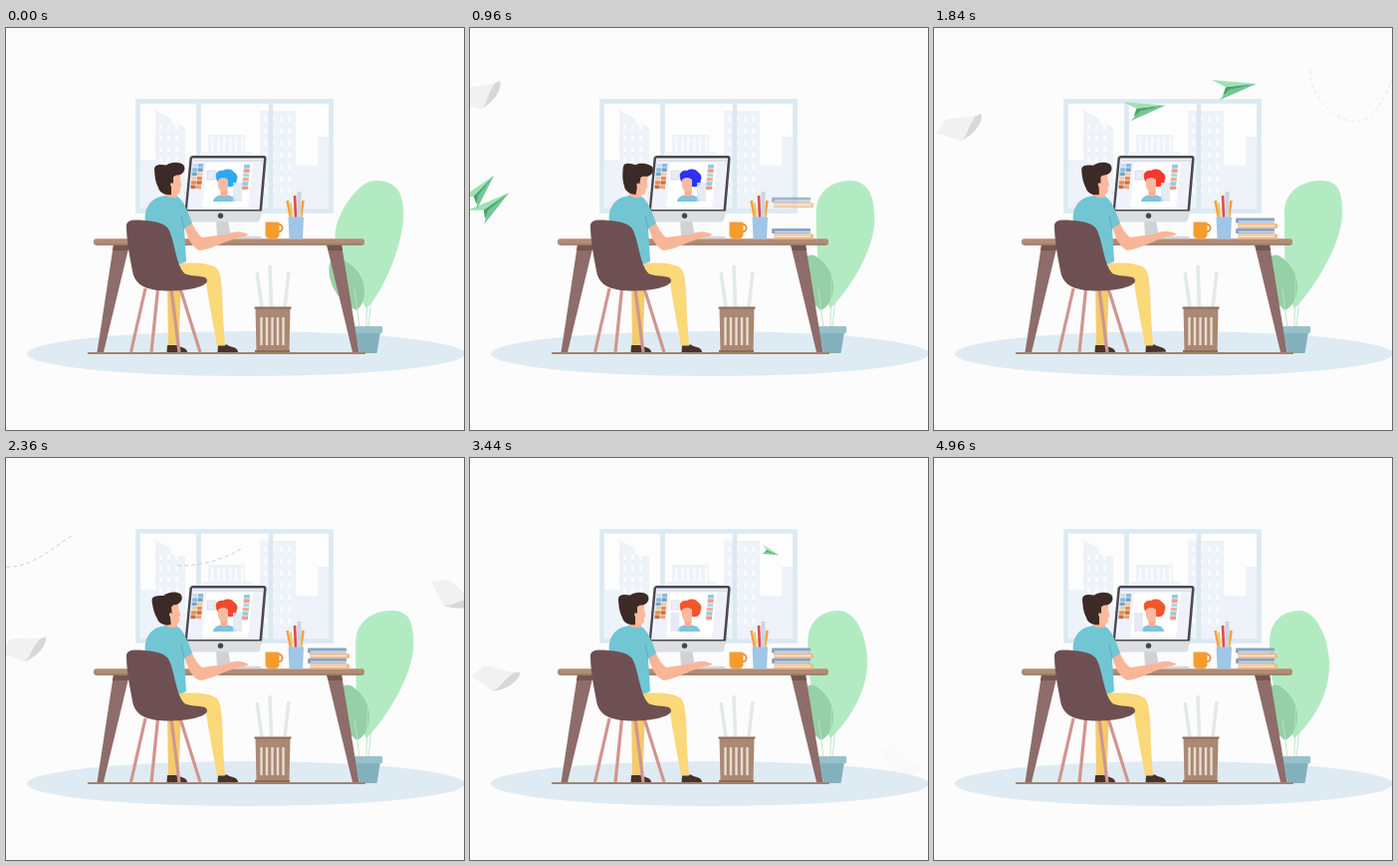
These frames come from a looping animation (460 by 403 pixels, 5 s). An HTML page:

```html
<!DOCTYPE html>
<html lang="en">
<head>
<meta charset="utf-8">
<title>Designer at a desk</title>
<style>
html, body { margin: 0; width: 100%; height: 100%; overflow: hidden; background: #fcfcfc; }
svg { display: block; width: 100vw; height: 100vh; }
.trail { fill: none; stroke: #c3d6d5; stroke-dasharray: 4 3; }
</style>
</head>
<body>
<svg viewBox="0 0 460 403">
  <defs>
    <g id="plane">
      <path fill="#9ce2b4" d="M0 0L-44-10L-31-1Z"/>
      <path fill="#4f9f72" d="M0 0L-31-1L-35 7L-27 3Z"/>
      <path fill="#72c993" d="M0 0L-28 2L-39 11Z"/>
    </g>
    <g id="sheet">
      <path fill="#f1f1f1" d="M-22 8L-14-6C-4-10 6-8 16-12L11 8L3 14Z"/>
      <path fill="#d8d8d8" d="M22-14C24-6 16 8 3 14C10 8 8 2 15-9C17-13 20-13 22-14Z"/>
    </g>
    <g id="pair">
      <rect x="303" width="39" height="5" rx="1" fill="#86a3c8"/>
      <rect x="306" y="2.8" width="36" height="1.4" fill="#d3dfec"/>
      <rect x="305" y="5.5" width="40" height="5" rx="1" fill="#f0bb8a"/>
      <rect x="305" y="7" width="37" height="1.600" fill="#f8e3cf"/>
    </g>
  </defs>
  <rect width="460" height="403" fill="#fcfcfc"/>
  <ellipse cx="241" cy="326.5" rx="220" ry="22.5" fill="#dfebf3"/>

  <!-- window -->
  <rect x="132.5" y="73.5" width="194" height="110" fill="#fdfdfe"/>
  <g fill="#eef2f9">
    <path d="M135 132H150V82L166 91V96L180 99V183H135Z"/>
    <path d="M197 124H203V107H240V124H247V183H197Z"/>
    <path d="M255 83H291V138H313V109H325V183H255Z"/>
  </g>
  <g id="lights" fill="#fafbfd"></g>
  <path d="M132.5 73.5H326.5V183.5H132.5ZM193.5 73V184M266 73V184" fill="none" stroke="#dae9f2" stroke-width="4.6"/>

  <!-- plant -->
  <path id="leaf" fill="#b2ebc2"/>
  <path id="small" fill="#96d0a6" d="M352 283C338 276 325 262 324.500 243C324 232 330 229 337 232C352 238 361 252 360 266C359 276 356 280 352 283Z"/>
  <path d="M364 220L362 300M350 262L355 300M367 270L364 300" fill="none" stroke="#bfdfca" stroke-width=".9"/>
  <path fill="#82b1bd" d="M351 305H376L372.500 326H355Z"/>
  <rect x="348" y="299" width="30" height="7" rx="1" fill="#96c1cb"/>

  <!-- bin -->
  <path d="M252 245L257 280M265 238L266.500 280M284 244L280 280" stroke="#e2e9eb" stroke-width="3.500"/>
  <path fill="#a98974" d="M250.500 280H285.500L284.500 325H251.500Z"/>
  <path d="M249.500 280.500H286.500M250 324H285" stroke="#8c6c5c" stroke-width="2"/>
  <path d="M256.500 290V318M262 290V318M267.500 290V318M273 290V318M278.500 290V318" stroke="#e8dcd4" stroke-width="2.400"/>

  <!-- desk -->
  <path d="M82 326H361" stroke="#a5816e" stroke-width="2"/>
  <path fill="#8e6c69" d="M108 217H124L98 325H91.500ZM322 217H337L354.500 325H348Z"/>
  <path fill="#77564f" d="M108 217H124L122.500 223H107ZM322 217H337L338 223H323.500Z"/>
  <rect x="88" y="211.200" width="272" height="6.500" rx="2.500" fill="#b18c75"/>
  <path d="M90 217H358" stroke="#93705f" stroke-width="1.200"/>

  <!-- monitor -->
  <path fill="#cfd1d4" d="M211 193H223L226 209H212Z"/>
  <path d="M205 210H255" stroke="#d5d7da" stroke-width="2.500" stroke-linecap="round"/>
  <path fill="#dcdee1" d="M180 182H257.500L255.500 191Q255 194.500 251.500 194.500H179Z"/>
  <path fill="#484a50" d="M187.500 128H259.500Q262 128.500 261.500 131.500L257 183.500H179.500L184.500 130.500Q185 128 187.500 128Z"/>
  <path fill="#eff2fa" d="M187 130.500H259L254.500 182H182Z"/>
  <path fill="#fff" d="M201 135H248L243 180H197Z"/>
  <path d="M188 133H258" stroke="#d8dde8" stroke-width="1.500"/>
  <circle cx="215.500" cy="188.300" r="2.700" fill="#45474c"/>
  <g id="swatches"></g>
  <rect id="tile" x="202" y="143" width="8" height="9" fill="#e9edf5" stroke="#cdd5e2" stroke-width=".7"/>
  <path fill="#7fc3e2" d="M208 174C208.500 169 213 167.500 219 167.500C226 167.500 230.500 169 231 174Z"/>
  <path fill="#f6b092" d="M215.500 158H222.500V167.500Q219 171 215.500 167.500Z"/>
  <path id="hair" d="M211 150C209.500 145 214 142 218 143C222 140.500 227 141.500 229 144.500C233 147 233 151 231.500 153C232 157 228 160 224 159C219 160 211 155 211 150Z"/>
  <path fill="#f9bb9e" d="M213 152Q218 148 223 152V159Q222 164.500 217.500 164Q213.500 163 213 158Z"/>
  <rect id="panel" y="155" width="9" height="19" fill="#dfe6f3" opacity=".8"/>

  <!-- desk items -->
  <circle cx="274" cy="200.500" r="3.600" fill="none" stroke="#e98c1f" stroke-width="1.800"/>
  <path fill="#f59c2b" d="M260.500 194.500H274.500V207Q274 211 270.500 211H264.500Q261 211 260.500 207Z"/>
  <path d="M282.500 173L286 190M298.500 173L296 190" stroke="#f4a13f" stroke-width="2.600"/>
  <path d="M294.500 164V190" stroke="#cfd4da" stroke-width="4"/>
  <path d="M290 168L291 190" stroke="#dd4950" stroke-width="2.600"/>
  <path d="M286 175L287.500 190" stroke="#f6c667" stroke-width="2"/>
  <path fill="#9fc6e9" d="M283.500 189.500H299L298 211.500H284.500Z"/>
  <use id="low" href="#pair"/>
  <use id="high" href="#pair"/>

  <!-- man -->
  <path fill="#f3cb69" d="M162 250H176L173.500 319H163Z"/>
  <path fill="#47322d" d="M162 318H173C176 321 182 320 182 325H161.500Z"/>
  <path id="foot" fill="#47322d" d="M213 317.500H222C226 320.500 233 319.500 233 325H212.500Z"/>
  <path fill="#fbd878" d="M170 237C186 234 206 236 212 241C217.500 248 217 264 218 290L220 318.500H212C208 296 204 276 201 256L172 250Z"/>
  <path fill="#f9b597" d="M160 156H172V169Q166 174 160 169Z"/>
  <path id="arm" fill="#f9b597" d="M179 199L187 196C190 203 194 208 197 210L222 207C228 204 235 202.500 243 207C243 209 238 209 233 210L222 214C210 219 200 223 194 223C186 219 182 210 179 199Z"/>
  <path fill="#72c5d2" d="M140 196C138 181 145 171 156 169L160 168Q167 172 172 169C178 172 183 184 187 196L179 201L181 234C174 238 165 237 157 236L141 205Z"/>
  <path d="M179 201L176 188" stroke="#58aebd" fill="none"/>
  <g id="head">
    <path fill="#fbb99c" d="M165 146H175V152L176.500 158L175 160V164Q174 167 170 167H163Z"/>
    <path fill="#3c2a26" d="M149 142C149 136 156 137 161 137.500C166 134 174 134 178 137C181 141 179 145 175 147C172 148 169 147 168 150V156C166 154 164 157 166 159V167C160 168 154 165 153 160C150 154 149.500 149 149 142Z"/>
  </g>

  <!-- chair -->
  <path d="M140 261L125.500 325M152.500 262L146 325M166 262L174 325M175 261L195 325" stroke="#d1958f" stroke-width="3.200"/>
  <path fill="#6e5053" d="M121 199C120.500 193 126 192 134 192.500C150 193.500 160 195 164 203C170 217 171 239 180 246.500C189 250 203 247 202 254C200 260 180 264 160 263.500C142 262.500 131 259 127.500 246C124 228 121 212 121 199Z"/>

  <g id="trails"></g>
  <g id="air"></g>
  <use id="sheetA" href="#sheet"/>
  <use id="sheetB" href="#sheet"/>
</svg>
<script>
const LOOP = 5000;
const $ = id => document.getElementById(id);
const set = (id, name, value) => $(id).setAttribute(name, value);
const clamp = v => Math.max(0, Math.min(1, v));
const span = (t, a, b) => clamp((t - a) / (b - a));
const ease = (t, a, b) => .5 - .5 * Math.cos(Math.PI * span(t, a, b));
const bump = (t, mid, width) => Math.exp(-(((t - mid) / width) ** 2));

// Each plane follows one Bezier curve and points along it
const flights = [
  { from: 600, to: 2240, size: () => 1, x: [-30, 58, 218, 520], y: [225, 135, 31, 50] },
  { from: 500, to: 2260, size: () => .95, x: [-30, 64, -2, 510], y: [215, 106, 99, 45] },
  { from: 2900, to: 3367, size: () => 1.1, x: [-40, 56, 51, -60], y: [40, 125, 120, 130] },
  { from: 2700, to: 4300, size: u => .3 + .6 * Math.abs(u - .25), x: [500, 147, 354, 520], y: [226, -17, 160, 140] }
];
const trails = [
  { d: "M8 160Q13 146 22 132", from: 1200, to: 1700 },
  { d: "M378 42C376 66 400 92 422 94C442 94 452 72 460 52", from: 1240, to: 1900 },
  { d: "M0 109C26 110 44 92 66 78", from: 2040, to: 2640 },
  { d: "M172 108C198 108 218 102 238 90", from: 1960, to: 2560 },
  { d: "M382 144L440 185", from: 2900, to: 3300 }
];
$("trails").innerHTML = trails.map((p, i) => `<path class="trail" id="trail${i}" d="${p.d}"/>`).join("");
$("air").innerHTML = flights.map((f, i) => `<use id="plane${i}" href="#plane"/>`).join("");

function grid(id, x, y, cols, rows, dx, dy, w, h, colors) {
  for (let r = 0; r < rows; r++) for (let c = 0; c < cols; c++) {
    const fill = colors ? ` fill="${colors[(r + c) % colors.length]}"` : "";
    const lean = colors ? r * .4 : 0;
    $(id).innerHTML += `<rect x="${x + c * dx - lean}" y="${y + r * dy}" width="${w}" height="${h}"${fill}/>`;
  }
}
grid("lights", 154, 97, 3, 7, 8, 11, 3, 5);
grid("lights", 206, 110, 6, 1, 6, 9, 2.5, 14);
grid("lights", 259, 89, 4, 7, 8, 12, 3, 5);
grid("swatches", 187.5, 136, 2, 6, 5.6, 4.3, 5, 3.6, ["#cfdcec", "#8cb9dc", "#6fa5c8", "#f4c8a2", "#e58d55", "#c5704c", "#eea265"]);
grid("swatches", 239, 137, 1, 6, 6, 4.3, 6, 3.6, ["#8fc9e8", "#f39a88", "#a9d6ea", "#efb090"]);

const curve = ([a, b, c, d], u) =>
  (1 - u) ** 3 * a + 3 * (1 - u) ** 2 * u * b + 3 * (1 - u) * u * u * c + u ** 3 * d;
const slope = ([a, b, c, d], u) =>
  (1 - u) ** 2 * (b - a) + 2 * u * (1 - u) * (c - b) + u * u * (d - c);

function place(id, x, y, angle, size = 1) {
  set(id, "transform", `translate(${x} ${y}) rotate(${angle}) scale(${size})`);
}

function drawLeaf(t) {
  const s = ease(t, -700, 1900) - ease(t, 2100, 3900);
  const back = 1 - ease(t, 0, 560);
  const left = 337 + 15 * s - 9 * back, top = 367 + 20 * s, right = 397 + 13 * s;
  const ly = 184 + 24 * back, ry = 208 - 22 * Math.max(s, back);
  set("leaf", "d", `M362 281C352 265 ${left} 240 ${left} ${ly}C${left} ${ly - 20} ${top - 17} 153 ${top} 153`
    + `C${top + 17} 153 ${right} ${ry - 27} ${right} ${ry}C${right} ${ry + 32} 378 266 362 281Z`);
  set("small", "transform", `rotate(${13 * (1 - back)} 352 284)`);
}

function drop(id, t, from, to, y, height) {
  const k = span(t, from, to);
  set(id, "transform", `translate(0 ${y - height * (1 - k) ** 1.5})`);
  set(id, "opacity", clamp(k * 1.3));
}

function drawMan(t) {
  const nod = 9 * bump(t, 960, 300) - 5 * bump(t, 2360, 500);
  const tap = t < 1920 ? Math.sin(t * Math.PI / 960) ** 2 : 0;
  const type = Math.abs(Math.sin(t * Math.PI / 240));
  set("head", "transform", `rotate(${nod} 166 171)`);
  set("foot", "transform", `rotate(${-11 * tap} 213 325)`);
  set("arm", "transform", `rotate(${-.8 * type} 190 205)`);
}

function drawScreen(t) {
  const hue = 202 + 36 * span(t, 0, 960) + 122 * span(t, 960, 1440) + 13 * span(t, 1440, 2800);
  set("hair", "fill", `hsl(${hue}, 88%, 56%)`);
  set("panel", "x", 228 - 27 * ease(t, 2600, 3500));
  set("tile", "opacity", 1 - span(t, 3400, 3700));
}

function drawAir(t) {
  flights.forEach((f, i) => {
    const u = span(t, f.from, f.to);
    const angle = Math.atan2(slope(f.y, u), slope(f.x, u)) * 180 / Math.PI;
    place("plane" + i, curve(f.x, u), curve(f.y, u), angle, f.size(u));
  });
  trails.forEach((p, i) =>
    set("trail" + i, "opacity", span(t, p.from, p.from + 120) - span(t, p.to - 120, p.to)));

  // One sheet rocks down on the left, the other drifts in from the right
  const rock = 30 * Math.exp((1440 - t) / 800) * Math.cos((t - 1440) * Math.PI / 800);
  const fall = 68 - 30 * ease(t, 900, 1440) + 152 * ease(t, 1440, 2360) + 72 * ease(t, 3000, 4000);
  place("sheetA", t < 640 ? -60 : 25 + rock, fall, 8 * ease(t, 1440, 2360) + 42 * ease(t, 3100, 3950));
  set("sheetA", "opacity", 1 - span(t, 3600, 4400));
  place("sheetB", 431 + 55 * (1 - span(t, 2050, 2500)), 136 + (t - 2360) * .154, 49);
  set("sheetB", "opacity", span(t, 2050, 2100) - span(t, 3040, 3480));
}

function draw(t) {
  drawLeaf(t);
  drop("low", t, 40, 600, 201, 94);
  drop("high", t, 600, 1200, 190.5, 83);
  drawMan(t);
  drawScreen(t);
  drawAir(t);
}

const start = performance.now();
function tick() {
  draw((performance.now() - start) % LOOP);
  requestAnimationFrame(tick);
}
tick();
</script>
</body>
</html>
```
